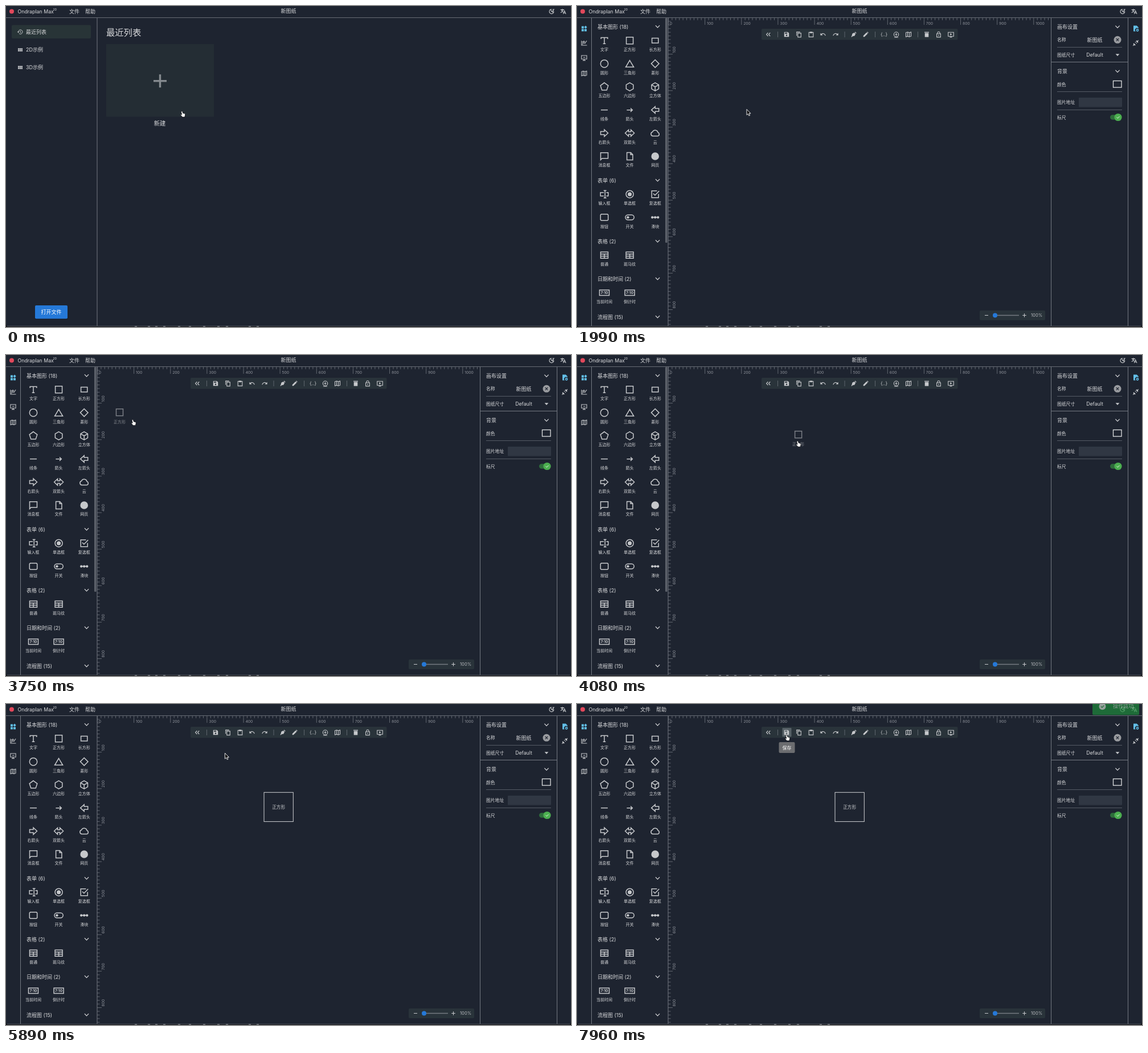
An HTML page for the animation above (7.99 s loop, 992x564 px).

```html
<!DOCTYPE html>
<html lang="zh-CN">
<head>
<meta charset="utf-8">
<title>Diagram editor</title>
<style>
html, body { margin: 0; width: 100%; height: 100%; overflow: hidden; background: #1e2430; }
svg { display: block; width: 100vw; height: 100vh; font-family: Inter, "Noto Sans CJK SC", "Noto Sans CJK", sans-serif; }
</style>
</head>
<body>
<svg id="stage" viewBox="0 0 992 564"></svg>
<script>
const LOOP = 7990;
const BG = '#1e2430', INK = '#d9dadc', ICON = '#c6c8cb', LINE = '#747982', BAR = '#29333a', BLUE = '#2579d8', SKY = '#62bfe8';

// ---- drawing helpers, all returning SVG markup ----
const text = (x, y, s, size = 9, anchor = 'start', fill = INK, extra = '') =>
  `<text x="${x}" y="${y + size * 0.37}" font-size="${size}" text-anchor="${anchor}" fill="${fill}" ${extra}>${s}</text>`;
const mid = (x, y, s, size, fill) => text(x, y, s, size, 'middle', fill);
const rect = (x, y, w, h, fill, rx = 0, extra = '') =>
  `<rect x="${x}" y="${y}" width="${w}" height="${h}" rx="${rx}" fill="${fill}" ${extra}/>`;
const line = (x1, y1, x2, y2, color = LINE, w = 1) =>
  `<path d="M${x1} ${y1}L${x2} ${y2}" stroke="${color}" stroke-width="${w}"/>`;
const dot = (x, y, r, fill, extra = '') => `<circle cx="${x}" cy="${y}" r="${r}" fill="${fill}" ${extra}/>`;
const group = (id, body, extra = '') => `<g id="${id}" ${extra}>${body}</g>`;
// Icons are drawn around their centre: d is stroked, f is filled.
const icon = (x, y, d, f = '', w = 1.1, color = ICON) =>
  `<g transform="translate(${x} ${y})"><path d="${d}" fill="none" stroke="${color}" stroke-width="${w}"/>` +
  `<path d="${f}" fill="${color}" fill-rule="evenodd"/></g>`;
const box = (x, y, w, h) => `M${x} ${y}h${w}v${h}h${-w}z`;
const ring = (x, y, r) => `M${x - r} ${y}a${r} ${r} 0 1 0 ${2 * r} 0a${r} ${r} 0 1 0 ${-2 * r} 0z`;
const poly = (n, r) => 'M' + Array.from({ length: n }, (_, i) => {
  const a = i / n * 2 * Math.PI;
  return (r * Math.sin(a)).toFixed(2) + ' ' + (-r * Math.cos(a)).toFixed(2);
}).join('L') + 'z';
const chevron = (x, y) => icon(x, y, 'M-3.6-1.8L0 1.8L3.6-1.8', '', 1.2, INK);

// ---- header and window frame ----
const MAP = 'M-4.5-3.2L-1.5-4.2L1.5-3.2L4.5-4.2V3.2L1.5 4.2L-1.5 3.2L-4.5 4.2ZM-1.5-4V3.2M1.5-3.2V4';
function header() {
  return dot(10, 9.5, 4, '#e2485b') +
    text(20.5, 9.5, 'Ondraplan Max', 8.8) + text(82.5, 6.5, '2D', 5) +
    text(111, 9.5, '文件') + text(139, 9.5, '帮助') + mid(496, 8.5, '新图纸', 9) +
    icon(958, 9.5, 'M-1-3.8A4 4 0 1 0 3.8 1.2A4 4 0 0 1-1-3.8ZM1.5-3.5H4L1.5-.5H4') +
    icon(978, 9.5, 'M-4.5-3H2M-1.2-4.6V-3M.5-3Q-.8.3-4.2 2.2M-3-3Q-2 0 .6 1.5M.3 4.6L2.6-1L5 4.6M1.2 2.8H4.1') +
    line(0, 20.5, 992, 20.5, '#676c75');
}
function windowEdge() {
  const bits = [226, 249, 262, 276, 302, 321, 346, 371, 386, 426, 440];
  return line(0, 562.5, 992, 562.5, '#50545c') + rect(0, 563, 992, 1, '#07080c') +
    bits.map(x => rect(x, 562, 4, 1.5, '#85888e')).join('') +
    '<path d="M0 558V564H6Q0 564 0 558ZM992 558V564H986Q992 564 992 558Z" fill="#07080c"/>';
}

// ---- start page ----
function startPage() {
  const cells = [-4, -1.2, 1.6].map(x => box(x, -2.8, 2.4, 2.5) + box(x, .2, 2.4, 2.5)).join('');
  return rect(10, 33.5, 139, 23.5, '#283437', 2) +
    icon(25, 45.5, 'M-3.4 0A3.7 3.7 0 1 1-2.2 2.8M0-2V.3L1.7 1.3', 'M-5.2-.4H-1.6L-3.4 1.7Z', 1) +
    text(35, 45.5, '最近列表') +
    icon(25, 77, '', cells) + text(35, 77, '2D示例') +
    icon(25, 108, '', cells) + text(35, 108, '3D示例') +
    rect(51, 528, 57, 23, '#12161d', 2, 'opacity=".6"') + rect(51, 526, 57, 23.5, BLUE, 2) + mid(79.5, 538, '打开文件', 9, '#fff') +
    line(160, 20, 160, 562) +
    text(176, 46.5, '最近列表', 15.3) + rect(176, 67, 189, 127.5, '#242d34') +
    rect(259, 130, 23, 3.4, '#858a8f') + rect(268.8, 120.2, 3.4, 23, '#858a8f') +
    mid(270, 206.5, '新建', 10.3);
}

// ---- left library ----
const ARROW_L = 'M-6.5 0L0-6V-2.7H6.5V2.7H0V6Z', ARROW_R = 'M6.5 0L0-6V-2.7H-6.5V2.7H0V6Z';
const GRID = box(-6.5, -5.5, 13, 11) + 'M-6.5-2H6.5M-6.5 1.8H6.5M0-2V5.5';
const CLOCK = box(-8.5, -4.8, 17, 9.6);
const SQUARE = box(-6, -6, 12, 12);
const SECTIONS = [
  ['基本图形 (18)', 36, [
    ['文字', 'M-5.8-2.8V-5.3H5.8V-2.8M0-5.3V5.5M-2.3 5.5H2.3'], ['正方形', SQUARE], ['长方形', box(-5.6, -4.3, 11.2, 8.6)],
    ['圆形', ring(0, 0, 6.7)], ['三角形', 'M0-5.8L7 6H-7Z'], ['菱形', poly(4, 6.8)],
    ['五边形', poly(5, 7.2)], ['六边形', poly(6, 7.2)], ['立方体', poly(6, 7.2) + 'M0 7V0L-6-3.4M0 0L6-3.4'],
    ['线条', 'M-6 0H6'], ['箭头', 'M-5.2 0H4.5M1.4-3.2L4.7 0L1.4 3.2'], ['左箭头', ARROW_L],
    ['右箭头', ARROW_R], ['双箭头', 'M-8 0L-2-5.8V-2.3H2V-5.8L8 0L2 5.8V2.3H-2V5.8Z'],
    ['云', 'M-4 5.3A3.8 3.8 0 0 1-4.6-2.1A5 5 0 0 1 4.8-1.2A3.4 3.4 0 0 1 4.6 5.3Z'],
    ['消息框', 'M-6.5-6.2H6.5V3.8H-4L-6.5 6.5Z'], ['文件', 'M-5-6.5H1.8L5.3-3V6.5H-5ZM1.5-6.5V-2.7H5.3'], ['网页', '', ring(0, 0, 6.8)]]],
  ['表单 (6)', 306, [
    ['输入框', 'M-1-3H-6.8V3H-1M3.4-3H6.8V3H3.4M1.2-6.5V6.5M-1.2-6.5H3.6M-1.2 6.5H3.6'],
    ['单选框', ring(0, 0, 6.5), ring(0, 0, 3.5)], ['复选框', 'M6-.5V6H-6V-6H3.2M-3.3-1.2L-.3 1.8L7-5.8'],
    ['按钮', 'M-5.5-5.5H5.5L6.7-4.3V4.3L5.5 5.5H-5.5L-6.7 4.3V-4.3Z'],
    ['开关', 'M-3.2-4.4H3.2A4.4 4.4 0 0 1 3.2 4.4H-3.2A4.4 4.4 0 0 1-3.2-4.4Z', ring(-3.2, 0, 2.2)],
    ['滑块', 'M-5 0H5', ring(-5, 0, 2.2) + ring(0, 0, 2.2) + ring(5, 0, 2.2)]]],
  ['表格 (2)', 413, [['普通', GRID], ['斑马纹', GRID]]],
  ['日期和时间 (2)', 479, [['当前时间', CLOCK], ['倒计时', CLOCK]]],
  ['流程图 (15)', 546, []]
];
function library() {
  let out = line(25.5, 20, 25.5, 562) +
    icon(12.5, 39.5, '', box(-4.5, -4, 4, 4) + box(-4.5, 1, 4, 4) + box(.5, 1, 4, 4) + 'M2.6-5L5.2-2.2L2.6.5L0-2.2Z', 1, SKY) +
    icon(12.5, 65, 'M-4.5-4V4H5M-3 2.4L-.7-1L1.4.8L4.6-4M-3.4-1L-.5-3.4L1.5-1.8') +
    icon(12.5, 91, 'M2 2.3H-4.6V-4H4.6V2.3ZM0 2.3V4.6M-2.5 4.6H2.5M-1.5-.8H2') +
    icon(12.5, 118.5, MAP);
  for (const [title, y, items] of SECTIONS) {
    out += text(36, y + .5, title) + chevron(141.5, y);
    items.forEach(([name, d, f], i) => {
      const x = 48 + i % 3 * 44.6, cy = y + 24.7 + Math.floor(i / 3) * 40.65;
      out += icon(x, cy, d, f, 1.5) + mid(x, cy + 15.7, name, 7);
      if (d === CLOCK) out += text(x, cy, '7:10', 6.6, 'middle', ICON, 'font-weight="700"');
    });
  }
  return out + line(160, 20, 160, 562);
}

// ---- canvas: rulers, toolbar, zoom ----
function rulers() {
  const step = 6.413;
  let d = '', out = '';
  for (let i = 0; i * step < 672; i++) {
    const p = i * step, big = i % 10 === 0;
    d += `M${160.5 + p} 20v${big ? 13 : 5}`;
    if (p < 542) d += `M160 ${20.5 + p}h${big ? 8 : 4.5}`;
    if (!big) continue;
    out += text(162.7 + p + (i ? 1.2 : 0), 30.5, i * 10, 6.8, 'start', '#8d9199');
    if (i && p < 542) out += text(0, 0, i * 10, 6.8, 'start', '#8d9199', `transform="translate(170.5 ${18.5 + p}) rotate(-90)"`);
  }
  return `<path d="${d}" stroke="#737881" stroke-width=".8"/>` + out;
}
const TOOLS = [
  [336, 'M-.6-3L-3.4 0L-.6 3M3.2-3L.4 0L3.2 3'],
  [368, '', 'M-4.2-4.2H2.2L4.2-2.2V4.2H-4.2Z' + box(-3, -3.2, 4.2, 2) + ring(0, 1.6, 1.4)],
  [389.5, box(-1.8, -2.4, 5.6, 7) + 'M-3.8 2.6V-4.4H2.2'],
  [411, box(-3.8, -3.6, 7.6, 8), box(-2, -4.8, 4, 2.6)],
  [432, 'M-3.5 .5C-1.5-2.6 3-2.4 4.2 2.2', 'M-4.6-2.6V1.4H-.6Z'],
  [454, 'M3.5 .5C1.5-2.6-3-2.4-4.2 2.2', 'M4.6-2.6V1.4H.6Z'],
  [486, 'M-4.2 4.4L0 0', 'M-3.8 3.4L-2.6-1.6L1-3.2L3 -1L1.4 2.4ZM1.6-4L2.6-4.8L4.6-2.4L3.8-1.6Z'],
  [507, '', 'M-4.3 4.3V2.3L1.4-3.4L3.4-1.4L-2.3 4.3ZM2-4L3-4.7L4.7-3L4-2Z'],
  [560.5, ring(0, 0, 4.2) + 'M0-2.2V2.2M-2.2 0H2.2M-3.5 5H3.5'],
  [582, MAP],
  [614, '', box(-3.3, -2.5, 6.6, 7) + box(-4, -4.4, 8, 1.2)],
  [635, box(-3.4, -1.2, 6.8, 5.8) + 'M-2-1.2V-2.8A2 2 0 0 1 2-2.8V-1.2', ring(0, 1.6, .9)],
  [656.5, box(-4.8, -3.8, 9.6, 7) + 'M-2 4.6H2', 'M-1.3-2.3L2-.3L-1.3 1.7Z']
];
function workspace() {
  return rulers() + rect(324, 40, 344.5, 19.5, BAR, 2) +
    rect(360.5, 42, 16, 15.5, '#566066', 1, 'id="saveHover"') +
    TOOLS.map(([x, d, f]) => icon(x, 50, d, f)).join('') + mid(539, 49.5, '{..}', 8.5, ICON) +
    [352.5, 470, 523.5, 598.5].map(x => line(x, 45, x, 55, '#5d656c')).join('') +
    rect(707, 535, 115, 17, BAR, 2) + line(716, 543.5, 722, 543.5, ICON) +
    line(730, 543.5, 776, 543.5, '#747b81', 1.4) + dot(734, 543.5, 4, BLUE) +
    icon(785.5, 543.5, 'M-3.3 0H3.3M0-3.3V3.3') + text(797, 543.5, '100%', 7.6, 'start', '#b9bcc0');
}

// ---- right side panels ----
const rule = y => line(843, y, 957, y, '#555b65');
const divider = y => line(833, y, 967, y);
const title = (y, s) => text(843, y, s) + chevron(949, y);
const label = (y, s) => text(843, y, s, 7.8);
const swatch = y => rect(941.5, y - 6, 14.5, 11.5, 'none', 0, 'stroke="#dfe0e2" stroke-width="1.3"');
const toggle = (y, id) => rect(936, y - 4.2, 17, 8.4, '#2d6d3b', 4.2) +
  group(id, dot(950, y, 6.6, '#4caf50') + icon(950, y, 'M-2.4 0L-.6 1.8L2.5-1.5', '', 1, '#e9f5e9'));
const number = (y, name, value) => label(y, name) + mid(913, y, value, 9) + rect(945, y - 6, 11.5, 12, '#e8e8ea', .5) +
  icon(950.7, y, 'M-2-1.5L0-3.5L2-1.5M-2 1.5L0 3.5L2 1.5', '', .8, '#555');

function canvasPanel() {
  return title(36.5, '画布设置') +
    label(59.5, '名称') + mid(909, 59.5, '新图纸', 9) + dot(949, 59.3, 6.5, '#9a9ca0') + icon(949, 59.3, 'M-2.3-2.3L2.3 2.3M2.3-2.3L-2.3 2.3', '', 1.1, BG) + rule(72.5) +
    label(86, '图纸尺寸') + mid(909, 86, 'Default', 8.7) + icon(949, 86, '', 'M-3.4-1.7H3.4L0 1.9Z') + divider(98.5) +
    title(114.5, '背景') + label(138, '颜色') + swatch(137.5) + rule(150.5) +
    label(169.5, '图片地址') + rect(881, 161, 76, 16.5, '#303743', 1) + rule(182.5) +
    label(196, '标尺') + toggle(195.5, 'rulerKnob') +
    icon(981, 39.5, '', 'M-4-5H1.8L4.6-2.2V0A3 3 0 0 0 0 5H-4Z' + ring(3, 3, 2.4) + ring(3, 3, .9), 1, SKY) +
    icon(981, 65, 'M-4.8 4.8L-2.8 2.8M4.8-4.8L2.8-2.8M-1-.6L.2-1.8M.6 1L1.8-.2', 'M-3.4 .2L-.2 3.4L-1.6 4.4L-3.5 3.5L-4.4 1.6ZM3.4-.2L.2-3.4L1.6-4.4L3.5-3.5L4.4-1.6Z');
}
const LAYERS = [[844.5, 190, '组合'], [895.5, 190, '取消组合'], [940, 190, '置于顶层'], [851, 216.5, '置于底层'], [895.5, 216.5, '上移一层'], [940, 216.5, '下移一层']];
const LAYER_ART = [
  [SQUARE.replace(/6/g, '4').replace(/12/g, '8') + box(-2, -2, 3, 3) + 'M2-1V2H-1', ''],
  [box(-4, -4, 4.5, 4.5) + box(-.5, -.5, 4.5, 4.5), ''],
  [box(-4.2, -4.2, 3.2, 3.2) + box(1, 1, 3.2, 3.2), box(-2.2, -2.2, 4.4, 4.4)],
  [box(-4.2, -4.2, 4, 4) + box(.2, .2, 4, 4) + box(-2, -2, 4, 4), ''],
  [box(-1.5, -1.5, 5.7, 5.7), box(-4.4, -4.4, 6.2, 6.2)],
  [box(-4.2, -4.2, 5.8, 5.8), 'M2.4-1.8H4.6V4.6H-1.8V2.4H2.4Z']
];
function shapePanel() {
  const star = 'M0-5L1.5-1.6L5-1.4L2.4 1L3.2 4.6L0 2.6L-3.2 4.6L-2.4 1L-5-1.4L-1.5-1.6Z';
  const corners = [[-4, -4], [4, -4], [-4, 4], [4, 4]].map(([x, y]) => box(x - 1.2, y - 1.2, 2.4, 2.4)).join('');
  return title(36.5, '基本设置') + number(59.5, '宽度', 80) + rule(72.5) + number(86, '高度', 80) + rule(98.5) +
    number(112, '旋转', 0) + rule(124.5) + label(138.5, '显示') + toggle(138, 'showKnob') + divider(150.5) +
    title(167.5, '组合和移动') +
    LAYERS.map(([x, y, s], i) => icon(x, y, ...LAYER_ART[i], 1) + mid(x, y + 11.5, s, 6.5)).join('') + divider(241.5) +
    title(258, '进度选项') + number(281, '百分比', 0) + rule(294) + label(307, '颜色') + swatch(307.3) + rule(320.5) +
    label(333.5, '垂直显示') + toggle(333.5, 'vertKnob') +
    icon(981, 39.5, box(-4, -4, 8, 8), corners, 1, SKY) +
    icon(981, 65, '', 'M0-4.6A4.6 4.6 0 1 0 0 4.6Q1.6 3.6 1 1.6H3Q4.8 1 4.6-.8Q4-4.4 0-4.6Z' + ring(-2.6, 0, .8) + ring(-1.2, -2.4, .8) + ring(1.6, -2.4, .8)) +
    text(981, 91, 'R<tspan font-style="italic">A</tspan>', 7.5, 'middle', ICON, 'font-weight="600"') +
    icon(981, 118, '', 'M-3-3H0A3 3 0 0 0 4 1V4.4H-4.4V-3Z' + ring(2.9, -2, 2.2)) +
    icon(981, 144.5, 'M-5 3L-2.6 2M-5 .4L-3 0', star) +
    icon(981, 171, 'M-4-3A4 1.6 0 0 1 4-3A4 1.6 0 0 1-4-3V3Q-3.5 4.4 0 4.6M-4 0Q-3 1.4 0 1.5M4-3V-.3M1.4 1.6H5M1.4 4.2H5');
}

// ---- shape on the canvas ----
function squareNode(color) {
  return rect(453, 155.3, 51.3, 51.3, 'none', 0, `stroke="${color}"`) + mid(478.7, 181.2, '正方形', 7.7, color);
}
function selection() {
  const edge = 'stroke="#2579d8" stroke-width=".9"', xs = [453, 478.6, 504.3], ys = [155.3, 181, 206.6];
  let out = line(478.6, 136, 478.6, 155, BLUE) + dot(478.6, 136, 3, '#fff', edge);
  xs.forEach((x, i) => ys.forEach((y, j) => {
    if (i !== 1 && j !== 1) out += rect(x - 2.7, y - 2.7, 5.4, 5.4, '#fff', 0, edge);
    else if (i !== 1 || j !== 1) out += dot(x, y, 2.7, '#fff', edge);
  }));
  return squareNode(BLUE) + out;
}

const CURSORS =
  group('arrow', '<path d="M0 0V10L2.3 7.9L3.9 11.4L5.5 10.7L4 7.3H7Z" fill="#0a0a0c" stroke="#fff" stroke-width=".9"/>') +
  group('hand', '<path d="M4.2 .6Q5.4-.2 5.9 1.2L6.6 3.8L9.6 4.6Q10.9 5.2 10.6 6.8L9.8 10.6H5.6L2.6 7Q2.2 5.6 3.8 6L4.8 6.6L3.6 2Q3.4 1 4.2 .6Z" fill="#fff" stroke="#0a0a0c" stroke-width=".7"/>') +
  group('move', '<path d="M0-5.6L2.3-3H.9V-.9H3V-2.3L5.6 0L3 2.3V.9H.9V3H2.3L0 5.6L-2.3 3H-.9V.9H-3V2.3L-5.6 0L-3-2.3V-.9H-.9V-3H-2.3Z" fill="#0a0a0c" stroke="#fff" stroke-width=".8"/>');

const stage = document.getElementById('stage');
stage.innerHTML = rect(0, 0, 992, 564, BG) +
  group('start', startPage()) +
  group('editor', library() + rect(155, 21, 3.6, 395, '#5d626b', 1.5, 'id="scroll"') + workspace() +
    line(832.5, 20, 832.5, 562) + line(967.5, 20, 967.5, 562) +
    group('canvasSide', canvasPanel()) + group('shapeSide', shapePanel()) +
    group('node', squareNode('#d0d2d5')) + group('picked', selection()) +
    group('ghost', icon(92.6, 60.7, SQUARE, '', 1.5) + mid(92.6, 77.4, '正方形', 7), 'opacity=".55"') +
    group('tip', rect(354.5, 67, 28, 19, '#6c6d70', 2) + mid(368.5, 76.7, '保存', 8, '#fff'))) +
  header() + windowEdge() +
  group('toast', rect(905, -32, 82, 32, '#1f8a3c', 2) +
    dot(922.5, -15, 6, '#c9d6cb') + icon(922.5, -15, 'M-2.5 0L-.6 1.9L2.7-1.6', '', 1.2, '#1f8a3c') + text(941, -15.5, '操作成功', 9.2, 'start', '#b4c7b8')) +
  CURSORS;

// ---- motion ----
const el = {};
stage.querySelectorAll('[id]').forEach(n => el[n.id] = n);
const show = (id, on) => el[id].setAttribute('display', on ? 'inline' : 'none');
const place = (id, x, y) => el[id].setAttribute('transform', `translate(${x} ${y})`);
const span = (t, a, b) => Math.min(1, Math.max(0, (t - a) / (b - a)));
const smooth = k => k * k * (3 - 2 * k);

// time, x, y, eased
const PATH = [
  [0, 304, 184.5], [50, 304, 184.5], [220, 298, 181.5, 1],
  [1990, 298, 181.5], [2760, 87, 73.5, 1], [2790, 87, 73.5], [2920, 89.5, 64, 1], [3060, 83, 68, 1], [3160, 84, 71, 1],
  [3640, 84, 71], [3720, 190, 111], [3750, 217, 113], [4050, 380, 150], [4390, 482, 179, 1], [4420, 484, 182],
  [4999, 484, 182], [5000, 478, 182], [5210, 478, 182], [5560, 428, 130], [5890, 384.5, 86.5], [6000, 372, 57],
  [6030, 372, 57], [6390, 363, 54, 1], [LOOP, 363, 54]
];
function pointer(t) {
  const i = Math.max(1, PATH.findIndex(p => p[0] >= t));
  const [t0, x0, y0] = PATH[i - 1], [t1, x1, y1, eased] = PATH[i];
  let k = span(t, t0, t1);
  if (eased) k = smooth(k);
  return [x0 + (x1 - x0) * k, y0 + (y1 - y0) * k];
}
function cursorKind(t, x, y) {
  if (t < 1400) return 'hand';
  if (t < 4390) return t >= 1990 && x < 153 || t > 3640 ? 'hand' : 'arrow';
  if (t < 5600 && x > 452 && y > 152) return 'move';
  return t >= 5980 ? 'hand' : 'arrow';
}

function draw(t) {
  const [x, y] = pointer(t), kind = cursorKind(t, x, y);
  const picked = t >= 4390 && t < 5600, dragging = t > 3640 && t < 4390;
  for (const id of ['arrow', 'hand', 'move']) show(id, id === kind);
  place(kind, x, y);

  show('start', t < 870);
  show('editor', t >= 870);
  show('scroll', t < 4390);
  el.scroll.setAttribute('fill', x > 153 && x < 161 ? '#7b8089' : '#5d626b');

  show('ghost', dragging);
  if (dragging) {
    const [gx, gy] = pointer(t - 30);
    place('ghost', gx - 84, gy - 71);
  }
  show('picked', picked);
  show('shapeSide', picked);
  show('canvasSide', !picked);
  show('node', t >= 5600);
  place('vertKnob', -4 * (1 - smooth(span(t, 4450, 4550))), 0);

  show('saveHover', t >= 5990);
  el.tip.setAttribute('opacity', smooth(span(t, 6150, 6390)));
  const drop = span(t, 7820, 7960);
  show('toast', drop > 0);
  place('toast', 0, 19.2 * drop);
  el.toast.setAttribute('opacity', .1 + .6 * drop);
}
function tick() {
  draw(performance.now() % LOOP);
  requestAnimationFrame(tick);
}
tick();
</script>
</body>
</html>
```
